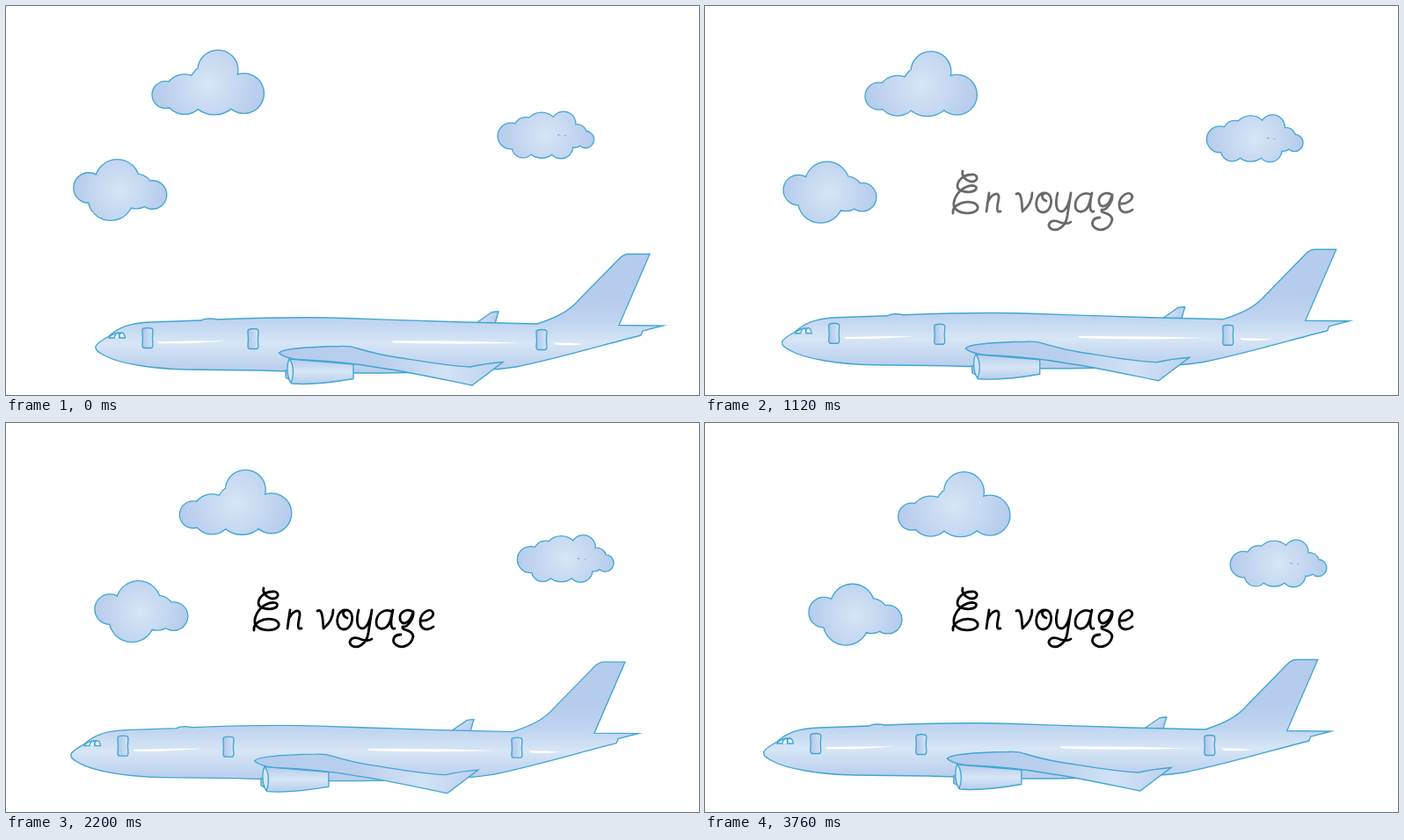
Write an HTML page with a canvas that moves like this. It is 788x443 px and loops after 3.92 s.

```html
<!DOCTYPE html>
<html lang="fr">
<head>
<meta charset="utf-8">
<title>En voyage</title>
<style>
  html, body { margin: 0; width: 100%; height: 100%; overflow: hidden; background: #fff; }
  canvas { display: block; }
</style>
</head>
<body>
<canvas id="stage" width="788" height="443" role="img" aria-label="En voyage"></canvas>
<script>
const ctx = document.getElementById('stage').getContext('2d');
const STEP = 40, LOOP = 3920, LAST_STEP = 94, PLANE_STOP = 69;
const LINE = '#42a6d2', DARK = '#b6ccec', LIGHT = '#d7e6f6';

function withStops(gradient, stops) {
  stops.forEach(([at, color]) => gradient.addColorStop(at, color));
  return gradient;
}
const linear = (x0, y0, x1, y1, ...stops) =>
  withStops(ctx.createLinearGradient(x0, y0, x1, y1), stops);
const radial = (x, y, r) =>
  withStops(ctx.createRadialGradient(x, y, 0, x, y, r), [[0, LIGHT], [1, DARK]]);

// Each cloud is a union of circles [x, y, outer radius] drifting by [dx, dy].
function cloud(drift, fill, circles) {
  const path = new Path2D();
  for (const [x, y, r] of circles) {
    path.moveTo(x + r - 1.2, y);
    path.arc(x, y, r - 1.2, 0, 2 * Math.PI);
  }
  return { drift, fill, path };
}
const clouds = [
  cloud([53.5, 5.6], radial(230, 88, 62),
    [[181.5, 101, 16], [203, 100.5, 23.5], [237, 94, 30.5], [241, 73, 23.5], [270.5, 99.5, 23.5]]),
  cloud([41.2, 8.7], radial(129, 210, 52),
    [[94, 207, 17.8], [126.5, 200, 26], [119, 218.5, 26.5], [148, 211, 20.5], [166.5, 215, 16.8]]),
  cloud([38.2, 13], radial(614, 147, 53),
    [[574, 148, 15.5], [591, 140, 14], [609, 141, 20.5], [634, 134, 14.5], [649, 146, 12],
     [659, 152, 10.3], [588, 160, 13.5], [609, 153, 20.8], [631, 160, 14.3], [646, 151, 11]])
];

const part = (fill, d) => ({ fill, path: new Path2D(d) });
const bodyFill = linear(0, 282, 0, 418,
  [0, DARK], [.38, DARK], [.58, '#c0d5f0'], [.75, LIGHT], [1, DARK]);

const door = (x, y) => part(
  linear(x, 0, x + 12, 0, [0, '#aec7e9'], [1, '#d3e3f5']),
  `M${x + 2} ${y}Q${x + 6} ${y - 1} ${x + 10} ${y}Q${x + 12} ${y} ${x + 12} ${y + 3}
   Q${x + 11} ${y + 11} ${x + 12} ${y + 19}Q${x + 12} ${y + 22} ${x + 10} ${y + 22.5}
   H${x + 2}Q${x} ${y + 22} ${x} ${y + 19}Q${x + 1} ${y + 11} ${x} ${y + 3}Q${x} ${y} ${x + 2} ${y}Z`);

const planeParts = [
  part(linear(540, 348, 556, 361, [0, LIGHT], [1, DARK]),
    'M534 361.5L552 349Q555 348 560 348L556 362Z'),
  part(bodyFill,
    `M102 387.5C104 383 111 380 117 376C128 366 140 361 165 360L222 358C226 355.5 232 355.5 240 357
     C290 355 345 354 385 355.5C430 357 480 359 520 360L604 362C628 354 641 347 652 334
     L697 288Q702 282.5 708 282.5H732L697 363.5L747 364L724 370L722 375
     C685 384 630 401 580 411C540 417 460 418 395 418C350 416 310 416 290 415
     L205 414C165 413 128 407 112 398C105 394 101 392 102 387.5Z`),
  door(155, 367), door(275, 368), door(603, 369),
  part('#eaf3fb', 'M117 378C119 374 124 372 132 372Q135 373 135.5 378L129 378Q125 376 123 378Z'),
  part('#eaf3fb', 'M123 378Q124 373 127 372Q129 373 129.5 378M129 378Q128 374 131 372'),
  part(DARK, 'M321 415H318V423L323 426Z'),
  part(linear(0, 402, 0, 431, [0, DARK], [.5, LIGHT], [1, DARK]),
    'M323 402C320 410 320 423 325 430C350 432 375 428 395 424.5V408Z'),
  part('#d7e6f6', 'M322 402C327 407 328 421 324 429C319 422 319 408 322 402Z'),
  part(linear(310, 388, 565, 420, [0, '#b5cced'], [.45, '#b9cfed'], [.75, '#d2e2f5'], [1, '#bbd1ee']),
    `M310.5 395C315 390 352 388 380 387.5Q392 387 398 389.5C410 393 424 397 438 399
     C470 404 500 410 528 411Q545 407 565 405.5L530 432C500 426 455 416 425 412
     C397 407 365 404 340 403Q317 402 310.5 395Z`)
];
const highlights = new Path2D(
  `M173 382.3Q212 381 252 381.2Q212 385 174 384.2Z
   M439 381.3Q510 380.8 584 383.4Q510 386 440 383.4Z
   M623 383.6Q640 383.4 658 385Q640 387 624 385.6Z`);

// Looped handwriting: E n v o y a g e
const lettering = new Path2D(
  `M293 188C291 194 298 200 304 200C312 199 310 191 303 192C294 192 287 199 287 205
   C287 212 303 214 308 209C311 204 302 203 295 207C286 212 282 222 283 228
   C287 238 307 238 310 231C312 223 297 221 288 226Q281 230 282 236
   M323 213L320 234M321 225C324 215 335 209 334 219C333 225 331 232 333 234L336 234
   M354 214C358 212 359 216 360 222L361 234C367 229 372 222 372 213
   M388 222C382 220 382 213 388 213C397 215 395 235 384 235C374 235 374 215 385 213
   M401 213C398 224 399 234 405 234C411 234 415 222 416 213L412 239C410 252 400 257 394 254
   C388 250 392 243 400 245C407 248 412 249 416 246
   M439 215C430 210 421 218 421 227C421 237 433 237 437 225L440 213C437 226 437 236 442 234
   M463 215C455 210 447 216 448 223C449 231 459 230 463 215C464 222 457 233 451 232
   C449 237 462 234 463 243C461 254 450 257 444 253C438 249 440 241 449 241
   M472 225C480 226 488 220 485 215C481 210 471 217 471 226C471 236 480 237 486 232`);

function outlined({ path, fill }) {
  ctx.fillStyle = fill;
  ctx.fill(path);
  ctx.stroke(path);
}

function drawCloud({ path, fill, drift: [dx, dy] }, progress) {
  ctx.save();
  ctx.translate(dx * progress, dy * progress);
  ctx.lineWidth = 2.6;
  ctx.strokeStyle = LINE;
  ctx.stroke(path);
  ctx.fillStyle = fill;
  ctx.fill(path); // hides the inner arcs
  ctx.restore();
}

function drawPlane(progress) {
  ctx.save();
  ctx.translate(-35.2 * progress, -13 * progress);
  ctx.lineWidth = 1.35;
  ctx.strokeStyle = LINE;
  planeParts.forEach(outlined);
  ctx.fillStyle = '#fff';
  ctx.fill(highlights);
  ctx.restore();
}

function drawLettering(alpha) {
  ctx.save();
  ctx.globalAlpha = alpha;
  ctx.lineWidth = 2.8;
  ctx.lineCap = ctx.lineJoin = 'round';
  ctx.strokeStyle = '#000';
  ctx.stroke(lettering);
  ctx.restore();
}

const start = performance.now();
function draw() {
  const time = (performance.now() - start) % LOOP;
  const step = Math.min(Math.floor(time / STEP), LAST_STEP);
  ctx.fillStyle = '#fff';
  ctx.fillRect(0, 0, 788, 443);
  clouds.forEach(c => drawCloud(c, step / LAST_STEP));
  drawPlane(Math.min(step / PLANE_STOP, 1));
  drawLettering(Math.max(0, Math.min((step - 14) / 24, 1)));
  requestAnimationFrame(draw);
}
draw();
</script>
</body>
</html>
```
